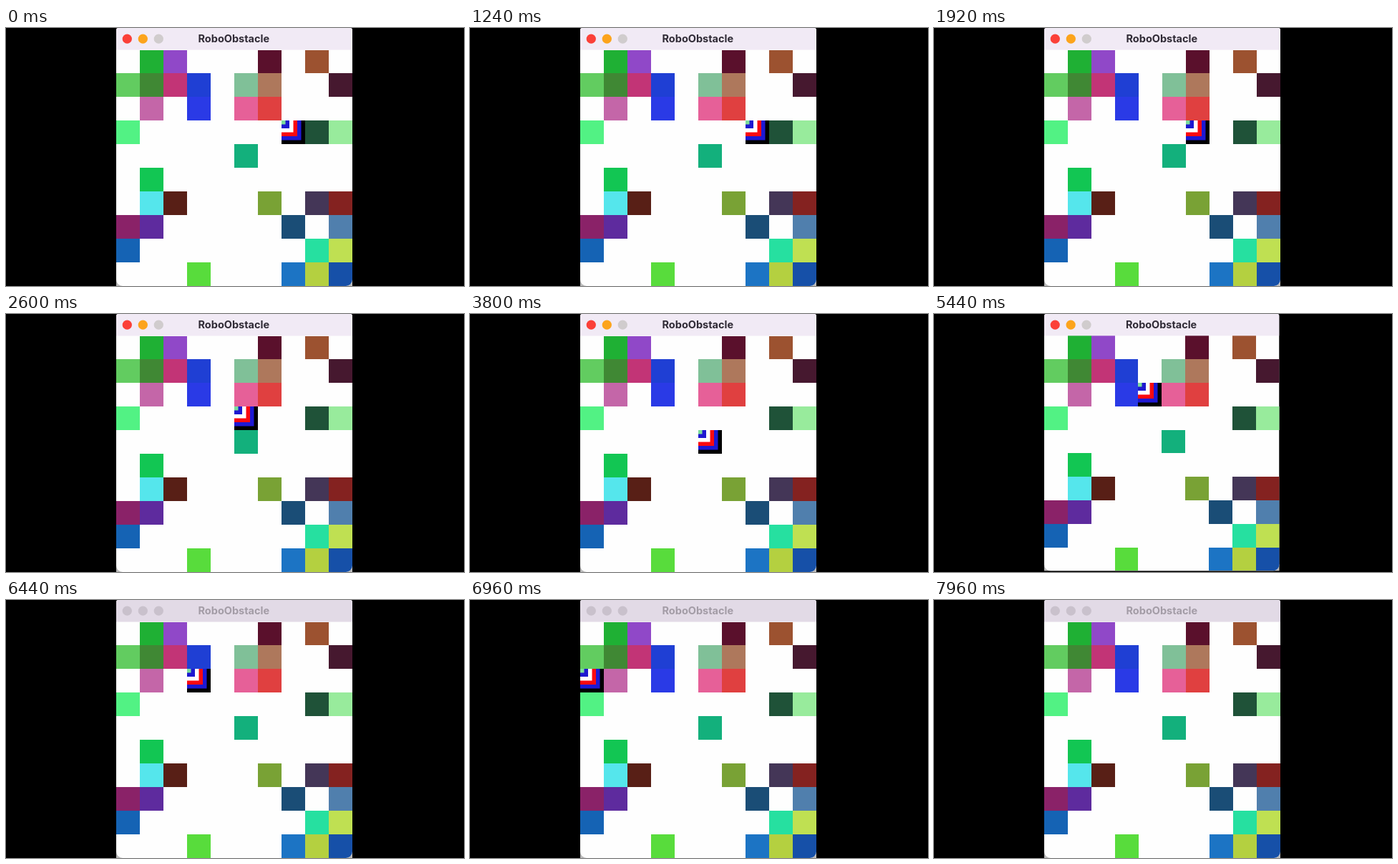
Animation, 640 px wide and 360 px high, one loop 8 s. Source, as an HTML page with a canvas:

```html
<!DOCTYPE html>
<html lang="en">
<head>
<meta charset="utf-8">
<title>RoboObstacle</title>
<style>
  html, body { margin: 0; width: 100%; height: 100%; overflow: hidden; background: #000; }
  canvas { display: block; width: 640px; height: 360px; }
</style>
</head>
<body>
<canvas id="stage" width="640" height="360"></canvas>
<script>
const ctx = document.getElementById("stage").getContext("2d");
const LOOP = 8000;
const LEFT = 154, TOP = 30.5, CELL_W = 33, CELL_H = 32.95;
const WINDOW_W = 330, WINDOW_H = 360, CORNER = 9;
const ZOOM_FROM = 4160, BLUR_AT = 6440, ZOOM = 0.9955;

// One string per row: column followed by colour.
const OBSTACLES = [
  "1#1fb034 2#9048c8 6#5a102c 8#9c5230",
  "0#62cc60 1#408834 2#c23476 3#1f3fd4 5#80c098 6#ae785c 9#46182f",
  "1#c466a8 3#2a3ae6 5#e66098 6#e04040",
  "0#52f284 8#1f5238 9#98eb9c",
  "5#13b07c",
  "1#12c653",
  "1#55e6ec 2#581f16 6#79a235 8#443657 9#842220",
  "0#8a2268 1#5e2b9e 7#1a4d76 9#507fad",
  "0#1563b4 8#26e0a0 9#bfe052",
  "3#58dc3c 7#1c74c4 8#b4d040 9#1650a8"
].map(row => row.split(" ").map(cell => ({ col: +cell[0], color: cell.slice(1) })));

// The robot steps one cell at a time from its starting cell.
const START = { col: 7, row: 3 };
const STEPS = { L: [-1, 0], R: [1, 0], U: [0, -1], D: [0, 1] };
const MOVES = [
  [160, "R"], [320, "L"], [600, "D"], [760, "U"],
  [1480, "L"], [2120, "L"], [2720, "U"], [3160, "D"], [3760, "D"],
  [4160, "R"], [4840, "U"], [5120, "L"], [5240, "L"], [5400, "U"],
  [6440, "L"], [6520, "L"], [6640, "L"], [6800, "L"],
  [7160, "R"], [7400, "U"], [7760, "U"], [7920, "U"]
];
const ROBOT_LAYERS = ["#000000", "#1e18d4", "#fa0a10", "#ffffff", "#1e18d0", "#7cdc9c"];

const ACTIVE = { bar: "#f1eaf5", text: "#302b36", lights: ["#fb4038", "#fca41c", "#d0cccd"] };
const INACTIVE = { bar: "#e2dae6", text: "#a39ca6", lights: Array(3).fill("#c9c1cc") };

function robotAt(time) {
  let { col, row } = START;
  for (const [at, key] of MOVES) {
    if (time < at) break;
    col += STEPS[key][0];
    row += STEPS[key][1];
  }
  return { col, row };
}

// Cell edges snap to whole pixels so neighbours meet without seams.
function cellRect(col, row, zoom) {
  const edgeX = c => Math.round(LEFT + c * CELL_W * zoom);
  const edgeY = r => Math.round((TOP + r * CELL_H) * zoom);
  const x = edgeX(col), y = edgeY(row);
  return [x, y, edgeX(col + 1) - x, edgeY(row + 1) - y];
}

function drawBoard(zoom) {
  OBSTACLES.forEach((cells, row) => {
    for (const { col, color } of cells) {
      ctx.fillStyle = color;
      ctx.fillRect(...cellRect(col, row, zoom));
    }
  });
}

function drawRobot({ col, row }, zoom) {
  if (row < 0) return;
  const [x, y, w, h] = cellRect(col, row, zoom);
  ROBOT_LAYERS.forEach((color, i) => {
    const part = 1 - i / ROBOT_LAYERS.length;
    ctx.fillStyle = color;
    ctx.fillRect(x, y, w * part, h * part);
  });
}

function drawTitleBar({ bar, text, lights }, zoom) {
  ctx.save();
  ctx.translate(LEFT, 0);
  ctx.scale(zoom, zoom);
  ctx.fillStyle = bar;
  ctx.fillRect(0, 0, WINDOW_W, TOP);
  lights.forEach((color, i) => {
    ctx.fillStyle = color;
    ctx.beginPath();
    ctx.arc(15.3 + i * 22, 15.2, 6.6, 0, Math.PI * 2);
    ctx.fill();
  });
  ctx.fillStyle = text;
  ctx.font = "700 14.5px Inter, 'Open Sans', sans-serif";
  ctx.textAlign = "center";
  ctx.fillText("RoboObstacle", 164.3, 20);
  ctx.restore();
}

function draw(time) {
  const zoom = time >= ZOOM_FROM && time < BLUR_AT ? ZOOM : 1;
  const width = WINDOW_W * zoom, height = WINDOW_H * zoom;
  ctx.fillStyle = "#000";
  ctx.fillRect(0, 0, 640, 360);

  // Pale desktop behind the rounded bottom corners.
  ctx.fillStyle = "#b9b9b9";
  ctx.fillRect(LEFT, height - CORNER, width, CORNER);

  ctx.save();
  ctx.beginPath();
  ctx.roundRect(LEFT, 0, width, height, [3, 3, CORNER, CORNER]);
  ctx.clip();
  ctx.fillStyle = "#fefefe";
  ctx.fillRect(LEFT, 0, width, height);
  drawBoard(zoom);
  drawRobot(robotAt(time), zoom);
  drawTitleBar(time < BLUR_AT ? ACTIVE : INACTIVE, zoom);
  ctx.restore();
}

function tick() {
  draw(performance.now() % LOOP);
  requestAnimationFrame(tick);
}
tick();
</script>
</body>
</html>
```
